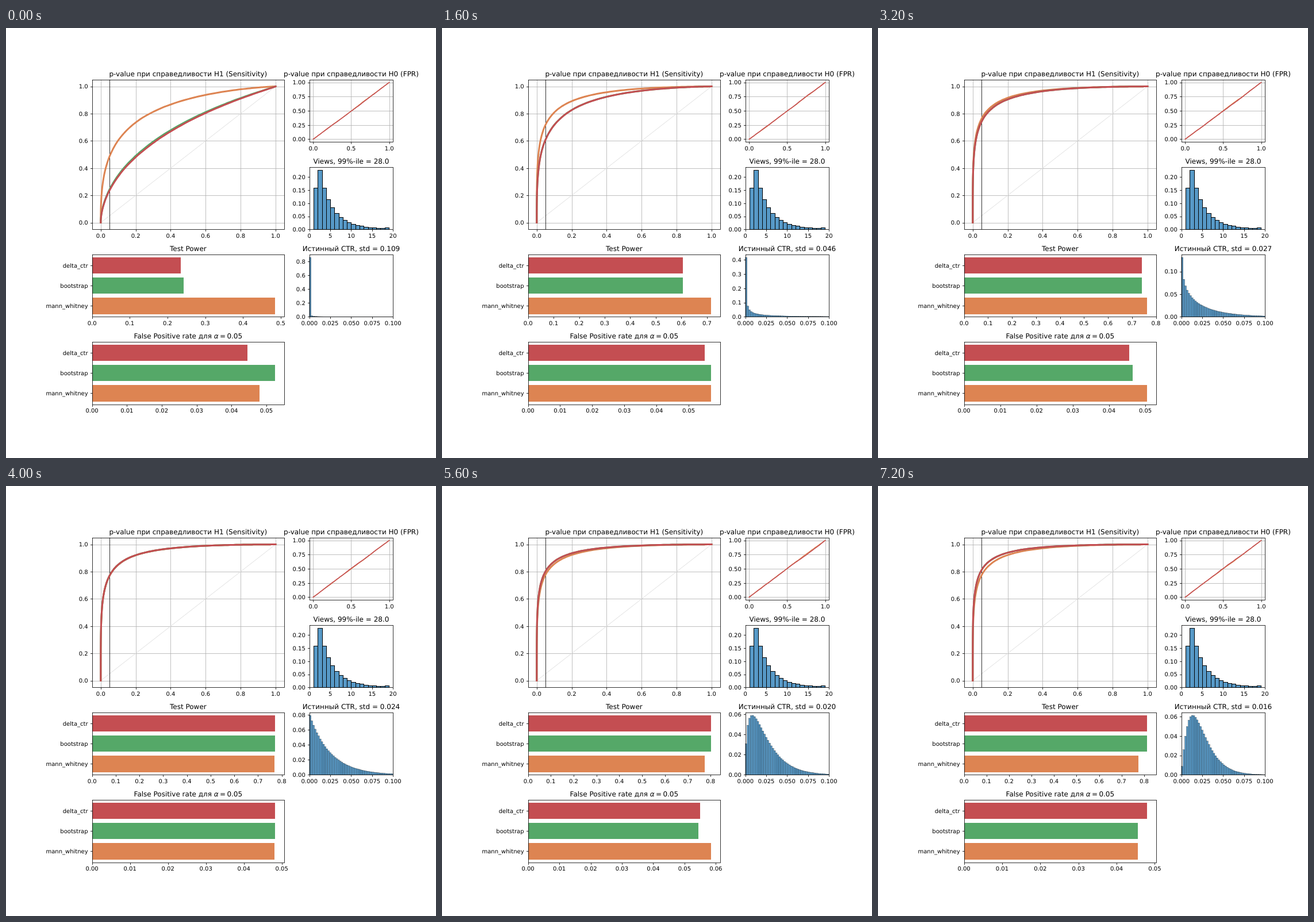
Write an HTML page that moves like this. It is 748x748 px and loops after 8000 ms.

```html
<!DOCTYPE html>
<html lang="ru">
<head>
<meta charset="utf-8">
<style>
html, body { margin: 0; width: 100%; height: 100%; overflow: hidden; background: #fff; }
svg { display: block; width: 100%; height: 100%; }
text { font: 10px "DejaVu Sans", sans-serif; white-space: pre; text-rendering: geometricPrecision; }
.title { font-size: 12px; }
.state { visibility: hidden; animation: show 8s step-end infinite; }
.curve { fill: none; stroke-linejoin: round; stroke-linecap: square; }
@keyframes show {
  0% { visibility: visible; }
  10%, 100% { visibility: hidden; }
}
</style>
</head>
<body>
<svg id="stage" viewBox="0 0 748 748"></svg>
<script>
const ORANGE = '#dd8452', GREEN = '#55a868', RED = '#c44e52', BLUE = '#5799c7';
const LEFT = 149.6, RIGHT = 527.75, WIDE = 334.5, NARROW = 145.44, ROW = 108.604;
const NAMES = ['delta_ctr', 'bootstrap', 'mann_whitney'];
const COLORS = [RED, GREEN, ORANGE];
const STATES = 10, SLOPE = .83, MEAN = .0243;

// Key points: [step, values...]
const concentration = [[0, 1], [1, 5], [2, 10], [7, 61], [9, 90]];
const falsePositive = [
  [0, .0445, .0525, .048], [1, .06, .0645, .045], [2, .055, .057, .057], [4, .0455, .0465, .0505],
  [6, .051, .05, .0455], [7, .055, .0545, .0585], [9, .048, .0455, .0455]
];

const rowY = i => 89.76 + 152.046 * i;
const snap = v => Math.round(v) + .5;
const range = (n, f) => Array.from({ length: n }, (_, i) => f(i));
const ticks = (max, step) => range(Math.floor(max / step + 1e-6) + 1, i => i * step);

function between(keys, t) {
  const k = Math.max(1, keys.findIndex(key => key[0] >= t));
  const [a, ...from] = keys[k - 1], [b, ...to] = keys[k];
  return from.map((v, i) => v + (to[i] - v) * (t - a) / (b - a));
}

// Each test's power approaches its limit exponentially
function power(t) {
  const delta = .82 - .585 * Math.exp(-.5 * t);
  return [delta, delta + .008 * Math.exp(-t), .775 - .29 * Math.exp(-.8 * t)];
}

const cdf = z => 1 / (1 + Math.exp(-1.5976 * z - .07056 * z ** 3));
function quantile(p) {
  let lo = -5, hi = 5;
  for (let i = 0; i < 40; i++) {
    const mid = (lo + hi) / 2;
    if (cdf(mid) < p) lo = mid; else hi = mid;
  }
  return lo;
}

function random(seed) {
  let s = seed * 7919 + 17;
  return () => (s = s * 16807 % 2147483647) / 2147483647;
}
// Random walk that starts and ends at zero
function bridge(seed, n, size) {
  const rnd = random(seed), walk = [0];
  for (let i = 1; i <= n; i++) walk.push(walk[i - 1] + rnd() - .5);
  return walk.map((v, i) => (v - walk[n] * i / n) * size);
}

const line = (x1, y1, x2, y2, color, w = .8) =>
  `<path d="M${x1} ${y1}L${x2} ${y2}" stroke="${color}" stroke-width="${w}"/>`;
const rect = (x, y, w, h, fill, extra = '') =>
  `<rect x="${x}" y="${y}" width="${w}" height="${h}" fill="${fill}" ${extra}/>`;
const label = (x, y, s, anchor = 'middle', cls = '') =>
  `<text x="${x}" y="${Math.round(y)}" text-anchor="${anchor}" class="${cls}">${s}</text>`;

function plot(x, y, w, h, x0, x1, y0, y1) {
  const X = v => x + (v - x0) / (x1 - x0) * w;
  const Y = v => y + h - (v - y0) / (y1 - y0) * h;
  const base = snap(y + h), side = snap(x);
  return {
    X, Y,
    title: s => label(x + w / 2, y - 6, s, 'middle', 'title'),
    frame: () => rect(side, snap(y), snap(x + w) - side, base - snap(y), 'none', 'stroke="#000" stroke-width=".8"'),
    xTicks: (vals, digits) => vals.map(v =>
      line(snap(X(v)), base, snap(X(v)), base + 3.5, '#000') + label(X(v), y + h + 14.6, v.toFixed(digits))).join(''),
    yTicks: (vals, text) => vals.map(v =>
      line(side - 3.5, snap(Y(v)), side, snap(Y(v)), '#000') + label(x - 7, Y(v) + 3.8, text(v), 'end')).join(''),
    grid: (xs, ys) =>
      xs.map(v => line(snap(X(v)), y, snap(X(v)), y + h, '#b0b0b0')).join('') +
      ys.map(v => line(x, snap(Y(v)), x + w, snap(Y(v)), '#b0b0b0')).join(''),
    curve: (pts, color, width) =>
      `<path class="curve" stroke="${color}" stroke-width="${width}" d="M${
        pts.map(([a, b]) => X(a).toFixed(2) + ' ' + Y(b).toFixed(2)).join('L')}"/>`
  };
}

function sensitivity(t) {
  const p = plot(LEFT, rowY(0), WIDE, rowY(1) + ROW - rowY(0), -.05, 1.05, -.05, 1.05);
  const marks = ticks(1, .2), alpha = snap(p.X(.05)), n = 160;
  const roc = (share, k) => {
    const shift = quantile(share) + 1.645 * SLOPE;
    const noise = bridge(t * 3 + (k === 2 ? 1 : 2), n, .003);
    const pts = range(n + 1, i => {
      const z = i / n * 8 - 4, y = cdf(shift + SLOPE * z);
      return [cdf(z), y + noise[i] * y * (1 - y) * 2];
    });
    return p.curve([[0, 0], ...pts, [1, 1]], COLORS[k], 3);
  };
  return p.grid(marks, marks) + p.curve([[0, 0], [1, 1]], '#dcdcdc', .9) +
    line(alpha, rowY(0), alpha, rowY(1) + ROW, '#000') +
    power(t).map(roc).reverse().join('') +
    p.xTicks(marks, 1) + p.yTicks(marks, v => v.toFixed(1)) + p.frame() +
    p.title('p-value при справедливости H1 (Sensitivity)');
}

function uniform(t) {
  const p = plot(RIGHT, rowY(0), NARROW, ROW, -.05, 1.05, -.05, 1.05);
  const xs = ticks(1, .5), ys = ticks(1, .25), n = 60;
  const diag = (color, seed) =>
    p.curve(bridge(t * 2 + seed, n, .004).map((v, i) => [i / n, i / n + v]), color, 1.5);
  return p.grid(xs, ys) + diag(ORANGE, 1) + diag(RED, 2) +
    p.xTicks(xs, 1) + p.yTicks(ys, v => v.toFixed(2)) + p.frame() +
    p.title('p-value при справедливости H0 (FPR)');
}

function viewsHist(t) {
  const peak = .2263, last = 18;
  const p = plot(RIGHT, rowY(1), NARROW, ROW, 0, 20, 0, peak * 1.05);
  const share = k => {
    const d = Math.abs(k - 2);
    return peak * Math.exp(-.36 * d / (1 + .026 * d));
  };
  const bars = range(last, i => {
    const k = i + 1, x = snap(p.X(k));
    // The last bin holds both of its edges
    const y = snap(p.Y(share(k) + (k === last ? share(k + 1) : 0)));
    return rect(x, y, snap(p.X(k + 1)) - x, snap(p.Y(0)) - y, BLUE, 'stroke="#000"');
  }).join('');
  return bars + p.xTicks(ticks(20, 5), 0) + p.yTicks(ticks(.2, .05), v => v.toFixed(2)) +
    p.frame() + p.title(`Views, 99%-ile = ${t === 1 ? '29.0' : '28.0'}`);
}

// Histogram of a beta distribution with a fixed mean
function ctrHist(t) {
  const [n] = between(concentration, t), a = MEAN * n, bin = .002;
  const mass = range(1 / bin, k =>
    (((k + 1) * bin) ** a - (k * bin) ** a) * (1 - (k + .5) * bin) ** (n - a - 1));
  const total = mass.reduce((sum, m) => sum + m);
  const top = Math.max(...mass) / total * 1.05;
  const p = plot(RIGHT, rowY(2), NARROW, ROW, 0, .1, 0, top);
  const bars = mass.slice(0, 50).map((m, k) => {
    const y = p.Y(m / total);
    return rect(p.X(k * bin), y, p.X(bin) - p.X(0), p.Y(0) - y, BLUE, 'stroke="#000" stroke-width=".3"');
  }).join('');
  const step = [.02, .05, .1, .2].find(s => s * 5 >= top);
  const std = Math.sqrt(MEAN * (1 - MEAN) / (n + 1));
  return bars + p.xTicks(ticks(.1, .025), 3) +
    p.yTicks(ticks(top, step), v => v.toFixed(step < .1 ? 2 : 1)) +
    p.frame() + p.title(`Истинный CTR, std = ${std.toFixed(3)}`);
}

function barChart(row, vals, step, digits, title) {
  const max = Math.max(...vals) * 1.05;
  const p = plot(LEFT, rowY(row), WIDE, ROW, 0, max, 2.54, -.54);
  const bars = vals.map((v, k) => {
    const x = Math.round(LEFT), y = Math.round(p.Y(k - .4));
    return rect(x, y, Math.round(p.X(v)) - x, Math.round(p.Y(k + .4)) - y, COLORS[k]);
  }).join('');
  return bars + p.xTicks(ticks(max, step), digits) + p.yTicks([0, 1, 2], k => NAMES[k]) +
    p.frame() + p.title(title);
}

const alphaTitle = 'False Positive rate для <tspan font-style="italic">α</tspan>' +
  '<tspan dx="2.3">=</tspan><tspan dx="2.3">0.05</tspan>';

document.getElementById('stage').innerHTML = range(STATES, t =>
  `<g class="state" style="animation-delay:${(t * .8 - 8).toFixed(1)}s">` +
  sensitivity(t) + uniform(t) + viewsHist(t) + ctrHist(t) +
  barChart(2, power(t), .1, 1, 'Test Power') +
  barChart(3, between(falsePositive, t), .01, 2, alphaTitle) + '</g>'
).join('');
</script>
</body>
</html>
```
